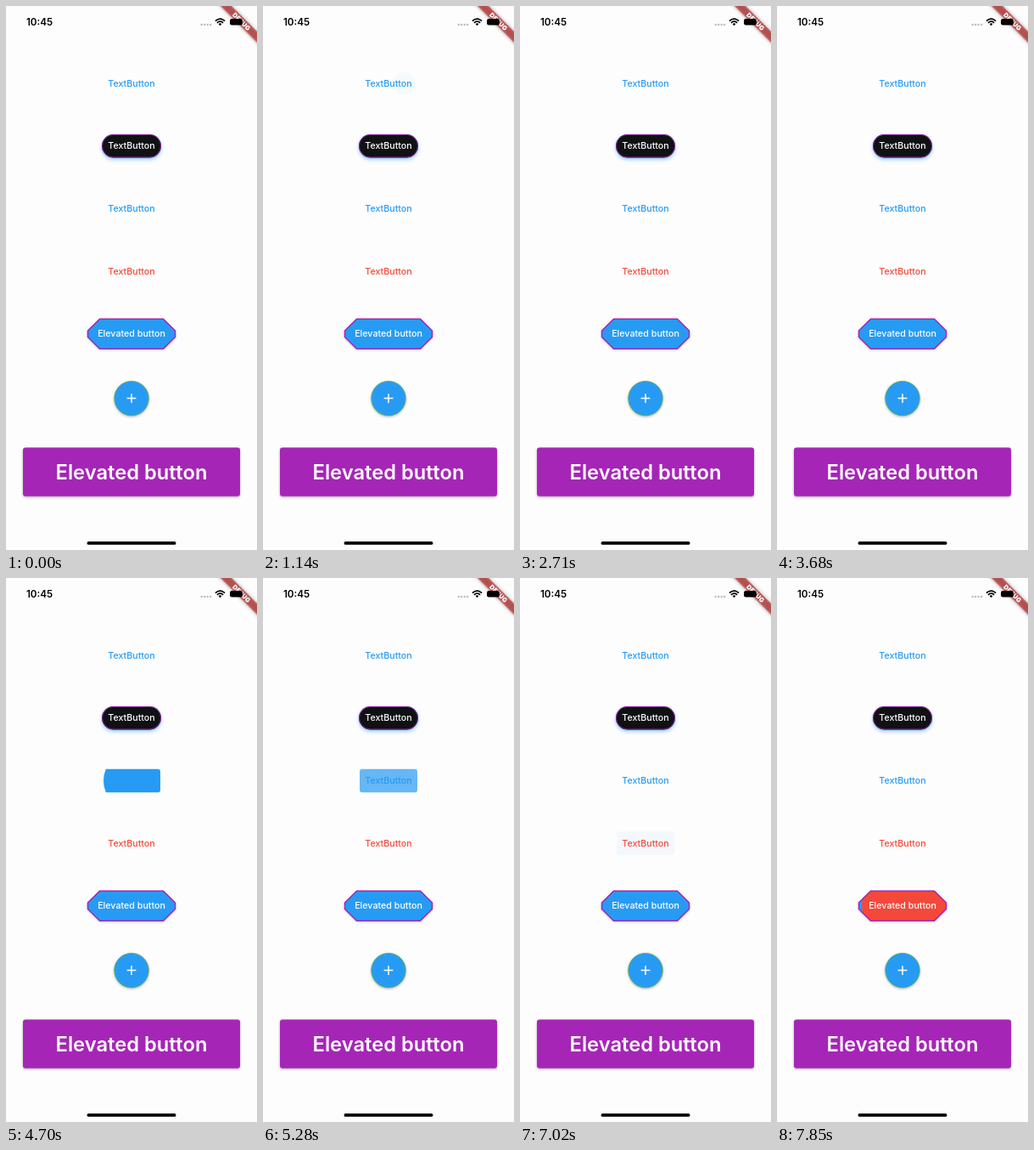
An HTML page for the animation above (8 s loop, 296 px wide and 640 px high).

```html
<!DOCTYPE html>
<html lang="en">
<head>
<meta charset="utf-8">
<title>Buttons</title>
<style>
  html, body { margin: 0; width: 100%; height: 100%; overflow: hidden; background: #fdfdfd; }
  svg { display: block; width: 296px; height: 640px; }
  text { font: 500 10.7px Inter, "Open Sans", sans-serif; text-anchor: middle; }
  .blue { fill: #279bf4; }
  .purple { fill: #a526b6; }
  .white { fill: #fff; }
  .red { fill: #f4483a; }
  .rim { fill: none; stroke: #a526b6; }
  .shade { filter: drop-shadow(0 1.5px 1.5px #0005); }
</style>
</head>
<body>
<svg viewBox="0 0 296 640">
  <defs>
    <rect id="flat1" x="114" y="77.3" width="68" height="27.4" rx="3"/>
    <rect id="flat3" x="114" y="224.8" width="68" height="27.4" rx="3"/>
    <rect id="flat4" x="114" y="298.3" width="68" height="27.4" rx="3"/>
    <rect id="pill" x="113" y="151" width="70" height="27.4" rx="13.7"/>
    <path id="hex" d="M96.5 382 110.5 368.3H185.5L199.5 382V389.5L185.5 403.2H110.5L96.5 389.5Z"/>
    <clipPath id="clip1"><use href="#flat1"/></clipPath>
    <clipPath id="clip2"><use href="#pill"/></clipPath>
    <clipPath id="clip3"><use href="#flat3"/></clipPath>
    <clipPath id="clip5"><use href="#hex"/></clipPath>
  </defs>

  <text x="39.5" y="23" style="font-size:11.6px;font-weight:600">10:45</text>
  <g fill="#bbb">
    <circle cx="230.7" cy="22" r="1.2"/><circle cx="234.2" cy="22" r="1.2"/>
    <circle cx="237.7" cy="22" r="1.2"/><circle cx="241.2" cy="22" r="1.2"/>
  </g>
  <g fill="none" stroke="#000" stroke-width="1.7">
    <path d="M246.9 17.6Q252.5 12.6 258.1 17.6M248.9 19.8Q252.5 16.6 256.1 19.8"/>
    <path d="M250.6 21.1Q252.5 19.6 254.4 21.1L252.5 23.2Z" fill="#000" stroke="none"/>
  </g>
  <g transform="translate(296 0) rotate(45)">
    <rect x="-46" y="21.2" width="92" height="9.2" fill="#b71c1c" fill-opacity=".63" style="filter:drop-shadow(0 0 2px #0008)"/>
    <text class="white" y="28.6" style="font-size:7.5px;font-weight:900">DEBUG</text>
  </g>
  <rect x="264" y="15" width="15" height="7.6" rx="2.4"/>
  <path d="M280 17.3Q281.6 18.8 280 20.3Z" fill="#0008"/>

  <g clip-path="url(#clip1)"><circle id="ripple1" class="blue"/></g>
  <text class="blue" x="148" y="94.8">TextButton</text>

  <use href="#pill" fill="#0f1113" style="filter:drop-shadow(0 2px 2px #2196f388)"/>
  <g clip-path="url(#clip2)"><circle id="ripple2" class="white"/></g>
  <rect class="rim" x="113.4" y="151.4" width="69.2" height="26.6" rx="13.3" stroke-width=".9"/>
  <text class="white" x="148" y="168.3">TextButton</text>

  <text class="blue" x="148" y="242.2">TextButton</text>
  <g clip-path="url(#clip3)"><circle id="ripple3" class="blue"/></g>

  <use id="tint" href="#flat4" fill="#f3f8fd"/>
  <text class="red" x="148" y="315.6">TextButton</text>

  <use href="#hex" class="blue shade"/>
  <g clip-path="url(#clip5)"><circle id="ripple5" class="red"/></g>
  <use href="#hex" class="rim" stroke-width="1.5"/>
  <text class="white" x="148" y="389.2">Elevated button</text>

  <circle class="blue shade" cx="148" cy="461.6" r="20.2" stroke="#4caf50" stroke-width=".8"/>
  <path d="M142.6 461.6H153.4M148 456.2V467" stroke="#fff" stroke-width="1.5"/>

  <rect class="purple shade" x="20" y="519.5" width="256" height="57.3" rx="3"/>
  <text class="white" x="148" y="556.6" style="font-size:23.7px;font-weight:600">Elevated button</text>
  <rect x="95.5" y="630" width="105" height="3.8" rx="1.9"/>
</svg>
<script>
const LOOP = 8000, CENTER = 148;

// Screen updates: runs of evenly spaced moments [first, last, count]
const runs = [[0, 0, 1], [1030, 2710, 16], [3320, 3320, 1], [3470, 3680, 3],
  [4260, 4700, 5], [4930, 5390, 5], [5670, 6440, 8], [6550, 7340, 8],
  [7460, 7460, 1], [7850, 7850, 1]];
const moments = runs.flatMap(([a, b, n]) =>
  Array.from({ length: n }, (_, i) => n > 1 ? a + (b - a) * i / (n - 1) : a));

// taps: [press time, hold time]
const ripples = [
  { id: 1, y: 91, w: 68, h: 27.4, shift: 20, alpha: .12, taps: [[1010, 0], [1595, 0], [1960, 0], [2320, 0]] },
  { id: 2, y: 164.7, w: 70, h: 27.4, shift: 15, alpha: .12, taps: [[3305, 0]] },
  { id: 3, y: 238.5, w: 68, h: 27.4, shift: 10, alpha: 1, taps: [[4190, 815]] },
  { id: 5, y: 385.7, w: 104, h: 35, shift: 30, alpha: 1, taps: [[7725, 0]] },
];

const clamp = v => Math.min(1, Math.max(0, v));

// cubic-bezier(.25, .1, .25, 1)
function ease(x) {
  let lo = 0, hi = 1;
  for (let i = 0; i < 20; i++) {
    const s = (lo + hi) / 2;
    if (.75 * s * (1 - s) + s ** 3 < x) lo = s; else hi = s;
  }
  return .3 * lo * (1 - lo) ** 2 + 3 * lo * lo * (1 - lo) + lo ** 3;
}

function drawRipple({ id, y, w, h, shift, alpha, taps }, t) {
  const el = document.getElementById("ripple" + id);
  const tap = taps.findLast(([start]) => start <= t);
  if (!tap) return el.setAttribute("opacity", 0);
  const [start, hold] = tap, age = t - start;
  const e = ease(clamp(age / (hold ? 1000 : 225)));
  const full = Math.hypot(w, h) / 2;
  const fade = clamp(age / 75) * (1 - clamp((age - hold - 225) / 150));
  el.setAttribute("cx", CENTER + shift * (1 - e));
  el.setAttribute("cy", y);
  el.setAttribute("r", full * .3 + (full * .7 + 3.8) * e);
  el.setAttribute("opacity", alpha * fade);
}

function draw(now) {
  const t = moments.findLast(m => m <= now % LOOP);
  ripples.forEach(r => drawRipple(r, t));
  document.getElementById("tint").setAttribute("opacity",
    clamp((t - 5620) / 200) * (1 - clamp((t - 7100) / 200)));
  requestAnimationFrame(() => draw(performance.now() - begin));
}

const begin = performance.now();
draw(0);
</script>
</body>
</html>
```
